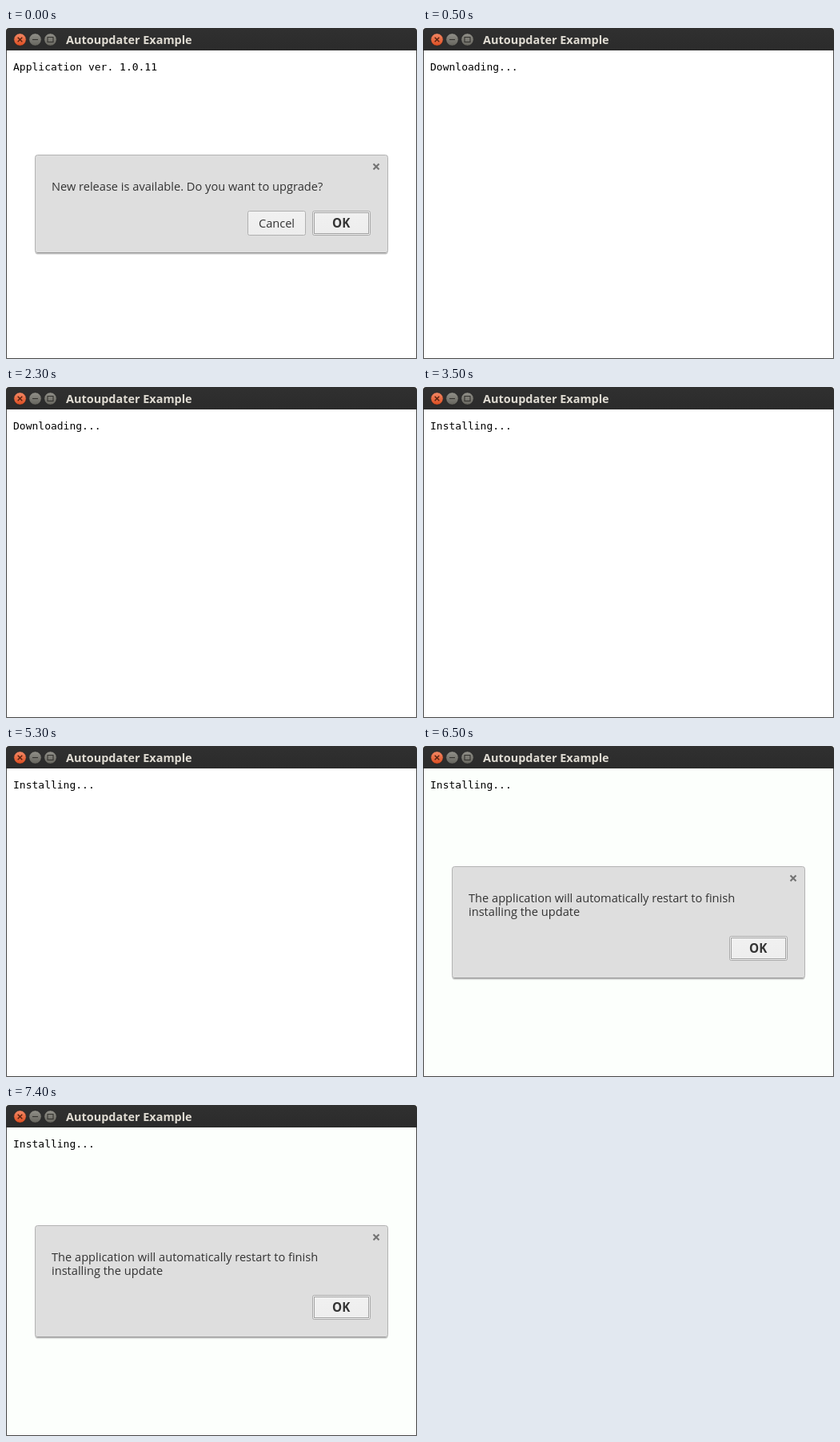
Recreate the animation shown at these times as an HTML page. Size 514x413 px, loop 8 s.

```html
<!DOCTYPE html>
<html lang="en">
<head>
<meta charset="utf-8">
<title>Autoupdater Example</title>
<style>
  html, body { margin: 0; width: 100%; height: 100%; overflow: hidden; background: #fff; }
  svg { display: block; width: 514px; height: 413px; }
  text { white-space: pre; }
  .title { font: bold 14.45px "Open Sans", sans-serif; fill: #dfdbd2; }
  .status { font: 13px "DejaVu Sans Mono", monospace; fill: #000; }
  .label { font: 14.6px "Open Sans", sans-serif; fill: #333; }
  .strong { font-weight: bold; font-size: 15.2px; text-anchor: middle; }
  .middle { text-anchor: middle; }

  .step { visibility: hidden; animation: 8s step-end infinite; }
  .ask { animation-name: ask; }
  .download { animation-name: download; }
  .install { animation-name: install; }
  .restart { animation-name: restart; }
  @keyframes ask { 0% { visibility: visible; } 6.25%, 100% { visibility: hidden; } }
  @keyframes download {
    0% { visibility: hidden; }
    6.25% { visibility: visible; }
    43.75%, 100% { visibility: hidden; }
  }
  @keyframes install { 0% { visibility: hidden; } 43.75%, 100% { visibility: visible; } }
  @keyframes restart { 0% { visibility: hidden; } 81.25%, 100% { visibility: visible; } }
</style>
</head>
<body>
<svg viewBox="0 0 514 413">
  <defs>
    <linearGradient id="bar" x2="0" y2="1">
      <stop offset="0" stop-color="#303030"/>
      <stop offset="1" stop-color="#2b2b2b"/>
    </linearGradient>
    <linearGradient id="orange" x2="0" y2="1">
      <stop offset="0" stop-color="#f58a67"/>
      <stop offset="1" stop-color="#dc4d20"/>
    </linearGradient>
    <linearGradient id="grey" x2="0" y2="1">
      <stop offset="0" stop-color="#92918a"/>
      <stop offset="1" stop-color="#65645d"/>
    </linearGradient>
    <linearGradient id="face" x2="0" y2="1">
      <stop offset="0" stop-color="#f1f1f1"/>
      <stop offset="1" stop-color="#ededed"/>
    </linearGradient>
    <path id="cross" d="M-3.5-3.5 3.5 3.5M3.5-3.5-3.5 3.5" fill="none" stroke="#737373" stroke-width="2.1"/>
    <g id="ok">
      <rect x="383.5" y=".5" width="72" height="30" rx="2" fill="url(#face)" stroke="#a9a9a9"/>
      <rect x="385.5" y="2.5" width="68" height="26" fill="none" stroke="#555" stroke-dasharray="1 1"/>
      <text class="label strong" x="419.2" y="21">OK</text>
    </g>
  </defs>

  <rect width="514" height="413" fill="#fff"/>
  <rect class="step restart" width="514" height="413" fill="#fcfffc"/>

  <path d="M0 28V4Q0 0 4 0H510Q514 0 514 4V28Z" fill="url(#bar)"/>
  <path d="M.5 28V412.5H513.5V28" fill="none" stroke="#454545"/>
  <g stroke="#242424" stroke-width=".8">
    <circle cx="17.5" cy="14.5" r="7.8" fill="url(#orange)"/>
    <circle cx="36.5" cy="14.5" r="7.8" fill="url(#grey)"/>
    <circle cx="55.5" cy="14.5" r="7.8" fill="url(#grey)"/>
  </g>
  <g fill="none" stroke="#353430" stroke-width="1.1">
    <path d="M14.7 11.7 20.3 17.3M20.3 11.7 14.7 17.3" stroke="#51200f" stroke-width="1.3"/>
    <path d="M33 14.5H40"/>
    <rect x="52" y="11.5" width="7" height="6"/>
  </g>
  <text class="title" x="75" y="20">Autoupdater Example</text>

  <text class="status step ask" x="9" y="53">Application ver. 1.0.11</text>
  <text class="status step download" x="9" y="53">Downloading...</text>
  <text class="status step install" x="9" y="53">Installing...</text>

  <g class="step ask">
    <rect x="36.5" y="160" width="441" height="122.5" rx="3" fill="#b4b4b4" opacity=".7"/>
    <rect x="36.5" y="158.5" width="441" height="122" rx="3" fill="#dedede" stroke="#b3b3b3"/>
    <path d="M39 280.5H475" stroke="#929292"/>
    <use href="#cross" x="463" y="173"/>
    <text class="label" x="57" y="203">New release is available. Do you want to upgrade?</text>
    <rect x="302.5" y="228.5" width="72" height="30" rx="2" fill="url(#face)" stroke="#b0b0b0"/>
    <text class="label middle" x="338.5" y="249">Cancel</text>
    <use href="#ok" y="228"/>
  </g>

  <g class="step restart">
    <rect x="36.5" y="152" width="441" height="139.5" rx="3" fill="#b4b4b4" opacity=".7"/>
    <rect x="36.5" y="150.5" width="441" height="139" rx="3" fill="#dedede" stroke="#b3b3b3"/>
    <path d="M39 289.5H475" stroke="#929292"/>
    <use href="#cross" x="463" y="165"/>
    <text class="label" x="57" y="195">The application will automatically restart to finish</text>
    <text class="label" x="57" y="212">installing the update</text>
    <use href="#ok" y="237"/>
  </g>
</svg>
</body>
</html>
```
